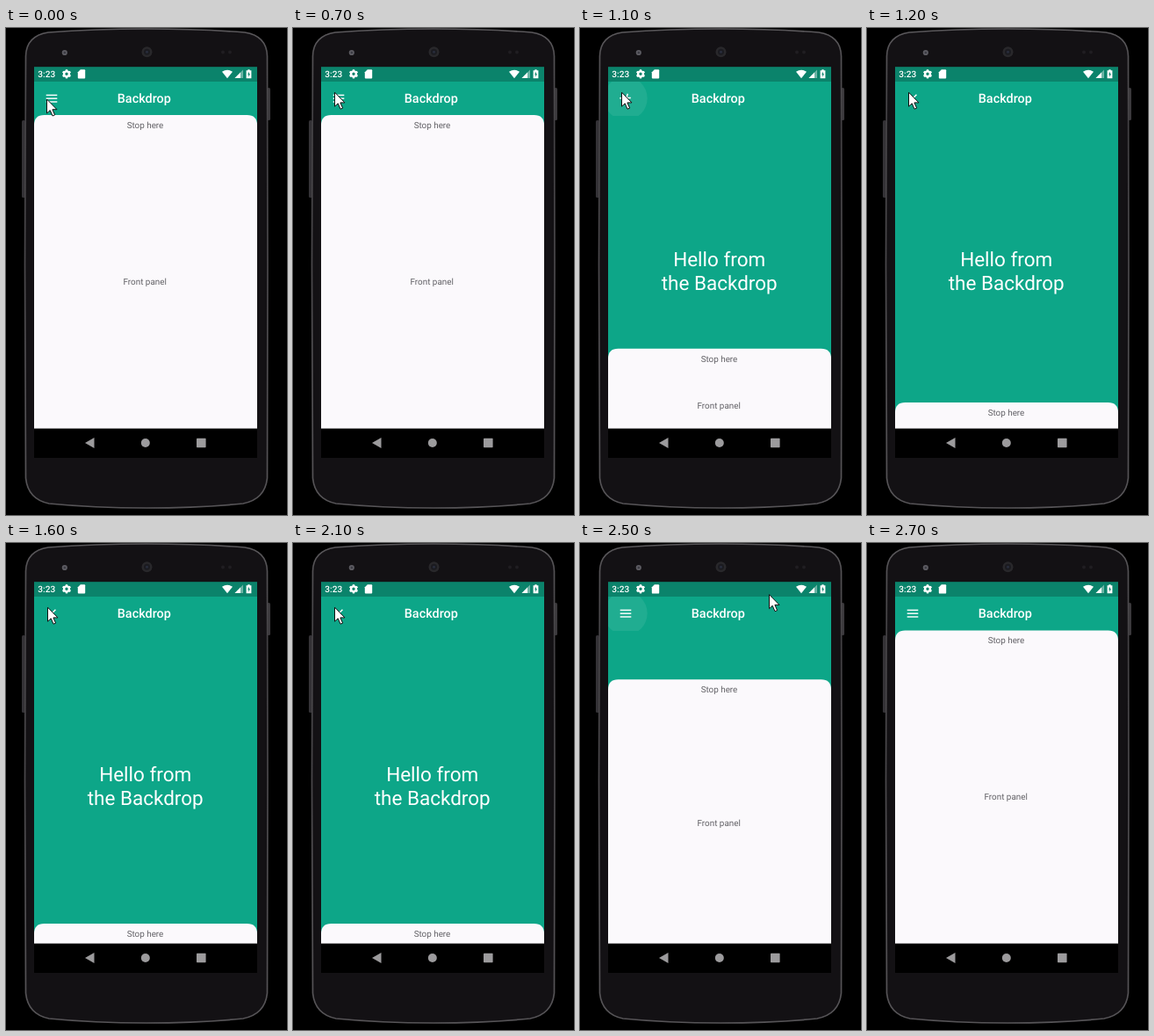
Write an HTML page that moves like this. It is 320 px wide and 554 px high and loops after 2800 ms.

```html
<!DOCTYPE html>
<html lang="en">
<head>
<meta charset="utf-8">
<title>Backdrop panel</title>
<style>
  html, body { margin: 0; width: 100%; height: 100%; overflow: hidden; background: #000; }
  svg { display: block; width: 100%; height: 100%; }
  text { font-family: Roboto, sans-serif; text-anchor: middle; text-rendering: geometricPrecision; }
  .white { fill: #fff; }
  .label { fill: #626166; font-size: 9.87px; }
</style>
</head>
<body>
<svg viewBox="0 0 320 554">
  <defs>
    <clipPath id="screen"><rect x="32" y="61" width="254" height="395"/></clipPath>
    <clipPath id="appBar"><rect x="32" y="61" width="254" height="39"/></clipPath>
    <linearGradient id="edge" x2="0" y2="1">
      <stop offset="0" stop-color="#5a585b"/>
      <stop offset=".2" stop-color="#434144"/>
      <stop offset="1" stop-color="#565457"/>
    </linearGradient>
  </defs>

  <!-- Phone -->
  <rect x="18" y="105" width="4" height="88" rx="1.5" fill="#343236"/>
  <rect x="297.5" y="68" width="3.5" height="37" rx="1.5" fill="#3b393c"/>
  <path d="M22.500 32Q23 9 48 5Q100 1 160 1T272 5Q297 9 297.500 32L298 270L297.500 512Q295 536 270 541Q220 546 160 546T49 541Q25 536 22.500 512L21.500 270Z"
        fill="#131114" stroke="url(#edge)" stroke-width="1.7"/>
  <circle cx="66.800" cy="28" r="3.100" fill="#5d5c62"/>
  <circle cx="66.800" cy="28" r="1.3" fill="#3a3b43"/>
  <circle cx="160.500" cy="27.300" r="6" fill="#29282b"/>
  <circle cx="160.500" cy="27.300" r="3.5" fill="#1b1b20"/>
  <circle cx="160.500" cy="27.300" r="1.5" fill="#292d3c"/>
  <circle cx="247" cy="27.500" r="2" fill="#201e22"/>
  <circle cx="255" cy="27.500" r="2" fill="#201e22"/>

  <!-- App -->
  <rect x="32" y="44.500" width="254" height="411.5" fill="#0da688"/>
  <g clip-path="url(#screen)">
    <g class="white" font-size="22.5">
      <text x="158.700" y="271.300">Hello from</text>
      <text x="158.700" y="297.900">the Backdrop</text>
    </g>
    <circle id="ripple" fill="#fff" clip-path="url(#appBar)"/>
    <g id="icon" stroke="#fff" stroke-width="1.45">
      <path id="topBar" d="M-6.300 0H6.300"/>
      <path id="midBar" d="M-6.300 0H6.300"/>
      <path id="lowBar" d="M-6.300 0H6.300"/>
    </g>
    <text class="white" x="157.300" y="85.300" font-size="14.4" font-weight="500">Backdrop</text>
    <g id="panel">
      <path d="M32 400V11.500Q32 0 43.500 0H274.500Q286 0 286 11.500V400Z" fill="#fbf9fc"/>
      <text class="label" x="158.500" y="14.800">Stop here</text>
    </g>
    <text id="front" class="label" x="158.200">Front panel</text>
  </g>

  <!-- Status bar -->
  <rect x="32" y="44.500" width="254" height="16.5" fill="#0b836b"/>
  <g class="white">
    <text x="46.200" y="56" font-size="10.1" font-weight="500">3:23</text>
    <circle cx="69" cy="52.300" r="2.900" fill="none" stroke="#fff" stroke-width="2.4"/>
    <g id="teeth"></g>
    <path d="M84.800 47.300H89.200Q90.200 47.300 90.200 48.300V56.500Q90.200 57.500 89.200 57.500H82.800Q81.800 57.500 81.800 56.500V50.300Z"/>
    <path d="M246 49.800Q252 45.500 258 49.800L252 57.300Z"/>
    <path d="M270 47.500V57H260.500Z" opacity=".4"/>
    <path d="M267 50.500V57H260.500Z"/>
    <path d="M275.400 47.200H277.600V48.200H279.400V57.300H273.600V48.200H275.400Z"/>
  </g>
  <path d="M277 49.500L275.200 53.200H276.300V55.800L278 52.200H277Z" fill="#0b836b"/>

  <!-- Navigation bar -->
  <rect x="32" y="455.600" width="254" height="33.4" fill="#000"/>
  <g fill="#9c9b9d">
    <path d="M100.500 466V478L90 472Z"/>
    <circle cx="158.800" cy="472" r="5"/>
    <rect x="217" y="466.700" width="10.6" height="10.6" rx=".7"/>
  </g>

  <path id="cursor" d="M0 0V16L3.700 12.600L6.500 19L9.100 17.900L6.400 11.700H11.500Z"
        fill="#fff" stroke="#111" stroke-width="1" stroke-linejoin="round"/>
</svg>
<script>
const LOOP = 2800, STEP = 100;
const PANEL_TOP = 99, TRAVEL = 334;
const OPEN_AT = 997.2, CLOSE_AT = 2388;
const el = id => document.getElementById(id);
const set = (id, attrs) => {
  for (const name in attrs) el(id).setAttribute(name, attrs[name]);
};
const clamp = v => Math.min(1, Math.max(0, v));
const mix = (a, b, k) => a + (b - a) * k;

el("teeth").innerHTML = Array.from({ length: 6 }, (_, i) =>
  `<rect x="67.800" y="47.200" width="2.400" height="2.500" transform="rotate(${i * 60} 69 52.300)"/>`).join("");

// Critically damped spring, started with a small push.
function spring(ms) {
  const s = Math.max(0, ms) / 800;
  return 1 - (1 + 20.36 * s) * Math.exp(-22.36 * s);
}

// Menu bars fold into a cross while the whole icon makes half a turn.
function drawIcon(open) {
  const k = clamp((open - 0.2) / 0.75);
  const gap = 3.8 * (1 - k);
  set("icon", { transform: `translate(52 80.200) rotate(${-180 * (1 - k)})` });
  set("topBar", { transform: `translate(0 ${-gap}) rotate(${45 * k})` });
  set("lowBar", { transform: `translate(0 ${gap}) rotate(${-45 * k})` });
  set("midBar", { opacity: clamp(1 - k * 1.3) });
}

function drawRipple(t) {
  const tick = (t - (t < 2300 ? 900 : 2300)) / STEP;
  const active = tick >= 0 && tick < 3;
  const k = active ? tick / 2 : 0;
  set("ripple", {
    cx: mix(45.400, 52, k), cy: mix(71, 80, k),
    r: active ? [4, 12, 24.7][tick] : 0,
    opacity: active ? [0.12, 0.22, 0.08][tick] : 0
  });
}

function drawCursor(t) {
  const [x, y] = t < 100 ? [46.500, 81]
    : t < 2200 ? [47.500, 73.200]
    : t < 2500 ? [53.500, 73.200] : [215.500, 58.700];
  set("cursor", {
    transform: `translate(${x} ${y})`,
    visibility: t < 2600 ? "visible" : "hidden"
  });
}

function frame() {
  const t = Math.floor(performance.now() % LOOP / STEP) * STEP;
  const open = t < CLOSE_AT ? spring(t - OPEN_AT) : 1 - spring(t - CLOSE_AT);
  const shift = TRAVEL * open;
  set("panel", { transform: `translate(0 ${PANEL_TOP + shift})` });
  set("front", { y: 291.500 + shift * 0.534 });
  drawIcon(open);
  drawRipple(t);
  drawCursor(t);
  requestAnimationFrame(frame);
}
frame();
</script>
</body>
</html>
```
